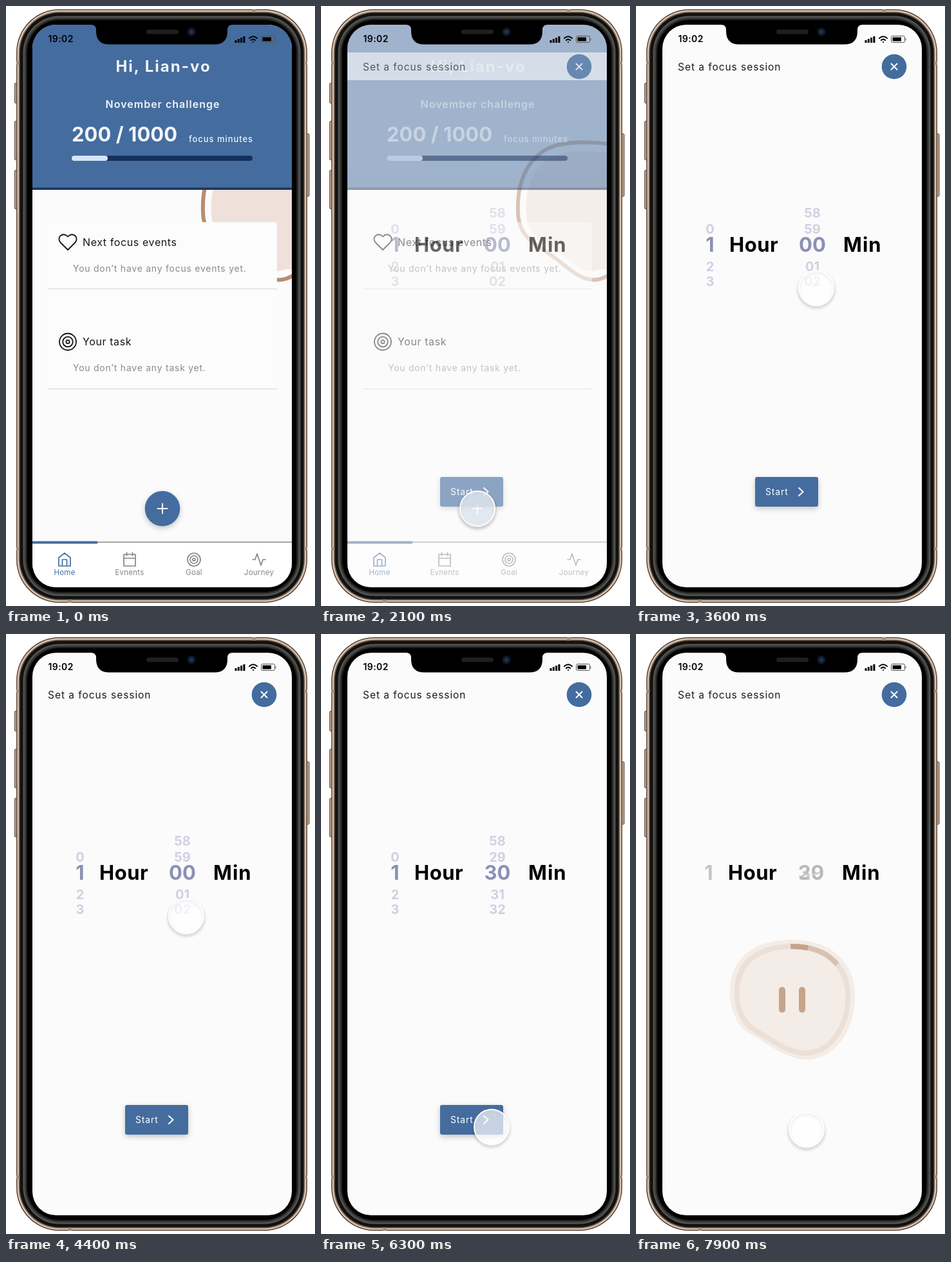
Recreate the animation shown at these times as an HTML page. Size 480 by 930 pixels, loop 8 s.

```html
<!DOCTYPE html>
<html lang="en">
<head>
<meta charset="utf-8">
<title>Focus session</title>
<style>
  html, body { margin: 0; width: 100%; height: 100%; overflow: hidden; background: #fff; }
  svg { display: block; width: 100%; height: 100%; font-family: Inter, sans-serif; }
  #home > *, #picker > * { opacity: var(--show); }
  .line { fill: none; stroke-linecap: round; stroke-linejoin: round; }
  .mid { text-anchor: middle; }
  .big { font-size: 31px; font-weight: 700; }
  .h2 { font-size: 16px; letter-spacing: .6px; fill: #171717; }
  .note { font-size: 14px; letter-spacing: .75px; fill: #8c8c8c; }
  .tab { font-size: 11.5px; letter-spacing: .25px; text-anchor: middle; }
  .lift { filter: drop-shadow(0 3px 4px rgba(0, 0, 0, .22)); }
</style>
</head>
<body>
<svg viewBox="0 0 480 930">
  <defs>
    <clipPath id="screen"><rect x="41" y="29" width="403" height="872" rx="37"/></clipPath>
    <path id="pebble" pathLength="100" d="M240 474C310 473 340 515 340 562C340 615 308 660 265 660C235 660 205 635 178 620C155 607 146 580 146 555C146 500 185 475 240 474Z"/>
    <path id="stone" d="M465 217C430 210 395 210 375 214C330 221 304 262 306 318C306 352 326 366 350 381C380 400 398 425 425 424.500C437 424 447 418 465 405"/>
    <g id="target" class="line"><circle r="10"/><circle r="6"/><circle r="2"/></g>
  </defs>

  <g id="phone">
    <g fill="#bb9f88" stroke="#5a483c">
      <rect x="13.500" y="119.500" width="5" height="31" rx="1.500"/>
      <rect x="13.500" y="178.500" width="5" height="60" rx="1.500"/>
      <rect x="13.500" y="254.500" width="5" height="60" rx="1.500"/>
      <rect x="466" y="198" width="5" height="97" rx="1.500"/>
    </g>
  </g>

  <g clip-path="url(#screen)">
    <rect x="41" y="29" width="403" height="872" fill="#fbfbfb"/>

    <g id="home">
      <g>
        <use href="#stone" class="line" stroke="#b98c6e" stroke-width="6"/>
        <use href="#stone" fill="#efe1da" transform="translate(404 318) scale(.87) translate(-404 -318)"/>
        <rect x="421" y="230" width="30" height="178" fill="#efe1da"/>
      </g>
      <g>
        <rect x="41" y="29" width="403" height="253" fill="#446c9e"/>
        <rect x="41" y="281.500" width="403" height="3.500" fill="#1c355f"/>
      </g>
      <g fill="#f1f4f8">
        <text class="mid" x="244.500" y="102" font-size="24" font-weight="700" letter-spacing="2">Hi, Lian-vo</text>
        <text class="mid" x="243.500" y="158" font-size="16" font-weight="600" letter-spacing="1">November challenge</text>
        <text class="big" x="102" y="210">200 / 1000</text>
        <text x="284" y="211" font-size="13" font-weight="500" letter-spacing=".95">focus minutes</text>
      </g>
      <g>
        <rect x="102" y="232" width="281" height="8" rx="4" fill="#16305c"/>
        <rect x="102" y="232" width="56" height="8" rx="4" fill="#d6e4f7"/>
      </g>
      <rect x="65" y="335" width="356" height="258" rx="4" fill="#fcfcfc"/>
      <path d="M65 438.500H421M65 593.500H421" stroke="#dedede" stroke-width="1.500"/>
      <g>
        <path class="line" stroke="#171717" stroke-width="1.800" d="M96 378L84.500 366.500C78 359 88 349 96 357.500C104 349 114 359 107.500 366.500Z"/>
        <text class="h2" x="119" y="372">Next focus events</text>
        <text class="note" x="104" y="412">You don’t have any focus events yet.</text>
        <use href="#target" transform="translate(96 520.500) scale(1.3)" stroke="#171717" stroke-width="1.400"/>
        <text class="h2" x="119" y="526">Your task</text>
        <text class="note" x="104" y="566">You don’t have any task yet.</text>
      </g>
      <g class="lift">
        <circle cx="243" cy="779" r="27.300" fill="#446c9e"/>
        <path class="line" stroke="#fff" stroke-width="2" d="M235.500 779H250.500M243 771.500V786.500"/>
      </g>
      <g>
        <rect x="41" y="831" width="403" height="70" fill="#fff"/>
        <rect x="41" y="830" width="403" height="2" fill="#a6a6a6"/>
        <rect x="41" y="829.500" width="101" height="4" fill="#446c9e"/>
        <g class="line" stroke="#858585" stroke-width="1.700">
          <path stroke="#446c9e" d="M82 855L91 848L100 855V868H82ZM87.500 868V858H94.500V868"/>
          <path d="M183 850H201V868H183ZM183 856H201M187.500 847V852M196.500 847V852"/>
          <use href="#target" x="292" y="858"/>
          <path d="M383 858H387L390 849L396 867L399 858H403"/>
        </g>
        <g fill="#858585">
          <text class="tab" x="91" y="882" fill="#446c9e">Home</text>
          <text class="tab" x="192" y="882">Evnents</text>
          <text class="tab" x="292" y="882">Goal</text>
          <text class="tab" x="393" y="882">Journey</text>
        </g>
      </g>
    </g>

    <g id="setup">
      <rect x="41" y="72" width="403" height="43" fill="#fbfbfb"/>
      <text x="65" y="100" font-size="15.500" letter-spacing=".95" fill="#1c1c1c">Set a focus session</text>
      <circle cx="401" cy="94" r="19.300" fill="#446c9e"/>
      <path class="line" stroke="#fff" stroke-width="2" d="M396.500 89.500L405.500 98.500M405.500 89.500L396.500 98.500"/>
      <g id="units" class="big">
        <text x="145" y="381" letter-spacing=".5">Hour</text>
        <text x="322" y="381" letter-spacing="1">Min</text>
      </g>
      <g id="picker">
        <g id="hours"></g>
        <g id="minutes"><g id="before"></g><g id="after"></g></g>
        <g>
          <rect class="lift" x="185" y="730" width="98" height="46" rx="3" fill="#446c9e"/>
          <text x="201" y="758" font-size="14" letter-spacing=".8" fill="#fff">Start</text>
          <path class="line" stroke="#fff" stroke-width="2" d="M253 747L259.500 753L253 759"/>
        </g>
      </g>
    </g>

    <g id="session">
      <g class="big mid" fill="#a3a3a3">
        <text x="113" y="381" fill="#c4c4c4">1</text>
        <text id="now" x="272" y="381">30</text>
        <text id="next" x="272" y="381">29</text>
      </g>
      <use href="#pebble" fill="#f4ece6"/>
      <g class="line" stroke-width="9" style="stroke-linecap:butt" transform="translate(243 567) scale(.89) translate(-243 -567)">
        <use href="#pebble" stroke="#ebe0d7"/>
        <use id="progress" href="#pebble" stroke="#c6a38b" stroke-dasharray="15 100"/>
        <use href="#pebble" stroke="#c6a38b" stroke-dasharray="5 100"/>
      </g>
      <path class="line" stroke="#c6a38b" stroke-width="10" d="M227 552V582M258 552V582"/>
    </g>

    <g id="status">
      <text x="65.500" y="56" font-size="14" font-weight="600" letter-spacing=".4">19:02</text>
      <path stroke="#000" stroke-width="3" d="M357 57V53M361.300 57V51M365.600 57V49M369.900 57V47"/>
      <path class="line" stroke="#000" stroke-width="2" d="M378 50Q384 44.500 390 50M380.800 53Q384 50.200 387.200 53M384 55.800V56"/>
      <rect x="396.500" y="46.500" width="21" height="10" rx="2" fill="none" stroke="#555"/>
      <rect x="398.500" y="48.500" width="13.500" height="6"/>
      <path d="M419 50V53.500" stroke="#666"/>
    </g>

    <circle id="ring" r="73.500" fill="#fff" fill-opacity=".2" stroke="#000" stroke-width="1.700"/>
    <g id="touch">
      <circle r="27" fill="none" stroke="#fff" stroke-width="2" style="filter:drop-shadow(0 3px 2px rgba(0,0,0,.35))"/>
      <circle r="27.500" fill="#fff" fill-opacity=".7"/>
    </g>

    <path d="M132 29Q140 29 140 37V39Q140 59.500 160 59.500H324Q344 59.500 344 39V37Q344 29 352 29Z"/>
  </g>
  <rect x="218" y="36.500" width="50" height="7" rx="3.500" fill="#1f1f20"/>
  <circle cx="288" cy="40" r="6.500" fill="#101a28"/>
  <circle cx="288" cy="40" r="3" fill="#1c3557"/>

<script>
  const $ = id => document.getElementById(id);
  const NS = "http://www.w3.org/2000/svg";

  function add(parent, tag, attrs, text = "") {
    const node = document.createElementNS(NS, tag);
    for (const key in attrs) node.setAttribute(key, attrs[key]);
    node.textContent = text;
    parent.append(node);
  }

  // Phone shell: nested rounded frames, from the outer edge inwards
  const shell = [[0, "#59463a"], [1.5, "#dcc8b5"], [3.8, "#7a6555"], [5.5, "#111"],
    [10.5, "#565653"], [12.5, "#3d3d3b"], [15, "#1c1c1b"], [17, "#000"]];
  for (const [inset, fill] of shell)
    add($("phone"), "rect", { x: 16 + inset, y: 5 + inset, width: 452 - 2 * inset,
      height: 920 - 2 * inset, rx: 67 - inset, fill });
  for (const [x, y, width, height] of [[382, 5, 6, 5], [96, 920, 6, 5],
    [16, 86, 5, 5], [463, 86, 5, 5], [16, 839, 5, 5], [463, 839, 5, 5]])
    add($("phone"), "rect", { x, y, width, height, fill: "#a58b78" });

  const rows = [328, 353, 381, 411, 434];
  function column(parent, x, values) {
    values.forEach((value, i) => {
      const chosen = i === 2;
      add(parent, "text", { class: "mid", x, y: rows[i], "font-weight": 700,
        "font-size": chosen ? 31 : 20, fill: chosen ? "#8d90b5" : "#cfd0e2" }, value);
    });
  }
  column($("hours"), 115, ["", "0", "1", "2", "3"]);
  column($("before"), 274, ["58", "59", "00", "01", "02"]);
  column($("after"), 274, ["58", "29", "30", "31", "32"]);

  const ramp = (t, from, to) => Math.min(1, Math.max(0, (t - from) / (to - from)));
  const ease = (t, from, to) => { const p = ramp(t, from, to); return p * p * (3 - 2 * p); };
  const mix = (a, b, p) => a + (b - a) * p;
  const fade = (id, value) => $(id).style.opacity = value;
  const move = (id, x, y, s = 1) => $(id).setAttribute("transform", `translate(${x} ${y}) scale(${s})`);
  const bend = (a, b, c, p) => mix(mix(a, b, p), mix(b, c, p), p);

  function draw(t) {
    const closed = ramp(t, 1950, 2250);
    const opened = ramp(t, 1950, 2200);
    const started = ease(t, 6650, 7150);
    $("home").style.setProperty("--show", 1 - closed);
    $("home").style.display = closed === 1 ? "none" : "";
    fade("setup", opened);
    $("picker").style.setProperty("--show", 1 - started);
    move("units", -2 * started, 0);

    const swap = ease(t, 4600, 5000);
    const pull = -11.5 * (ease(t, 4700, 5200) - ease(t, 5200, 5600));
    fade("before", 1 - swap);
    fade("after", swap);
    move("minutes", 0, pull);

    const ring = ease(t, 4400, 4900) * (1 - ease(t, 5300, 5600));
    fade("ring", ring);
    move("ring", 278.5, 439 + pull, mix(.37, 1, ring));

    const up = ease(t, 2250, 3550);
    const down = ease(t, 5600, 6250);
    fade("touch", ramp(t, 1000, 1300) * (1 - ring));
    move("touch", mix(bend(243, 225, 280, up), 265, down),
      mix(bend(779, 580, 437, up), 764, down) + 4 * started);

    const tick = ramp(t, 7300, 8500);
    fade("session", started);
    fade("now", 1 - tick);
    fade("next", tick);
    fade("progress", tick);
  }

  // The picture advances ten times a second
  function frame(now) {
    draw(Math.floor(now % 8000 / 100) * 100);
    requestAnimationFrame(frame);
  }
  draw(0);
  requestAnimationFrame(frame);
</script>
</svg>
</body>
</html>
```
